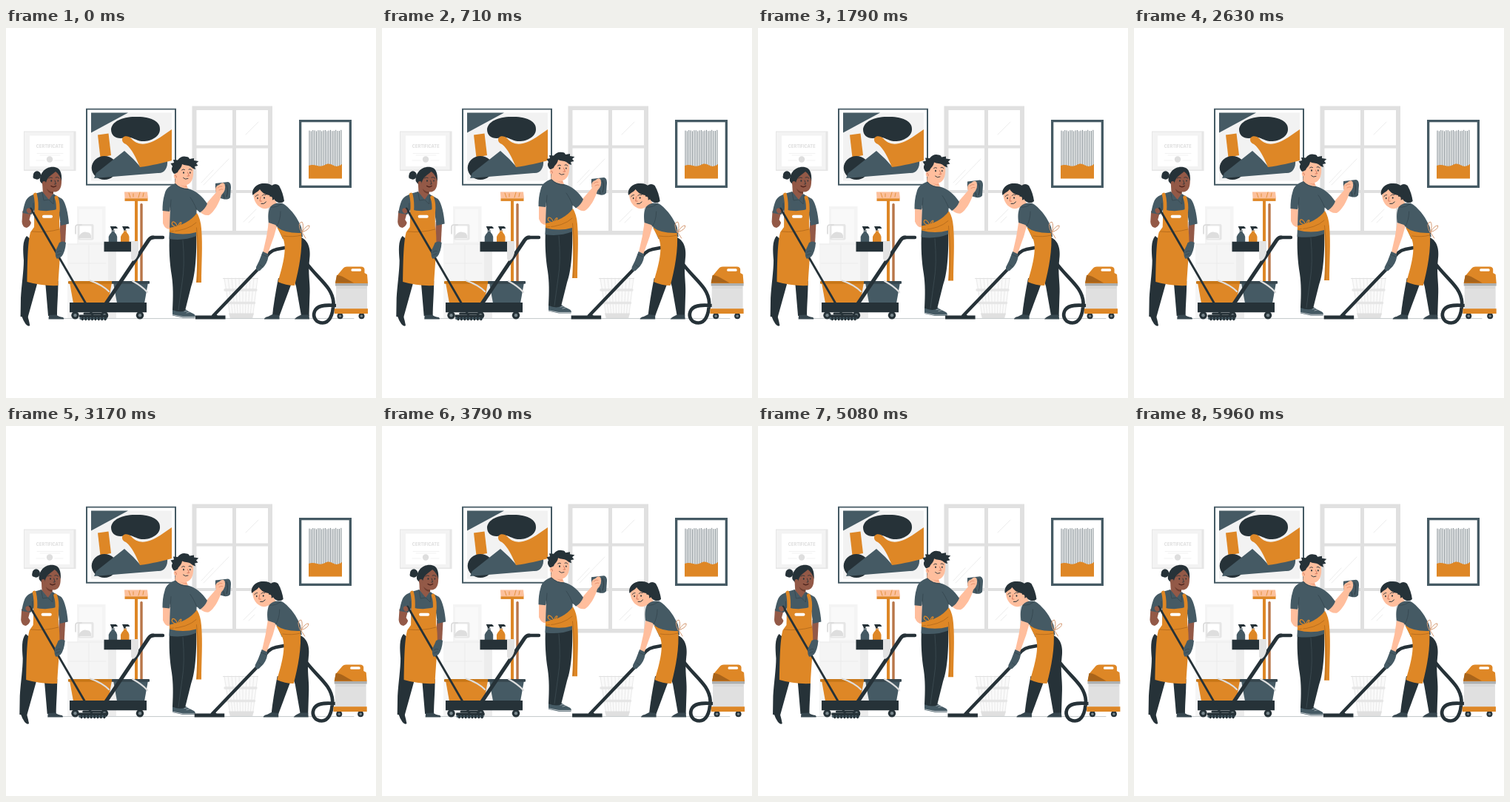
Recreate the animation shown at these times as an HTML page with a canvas. Size 500x500 px, loop 6 s.

```html
<!DOCTYPE html>
<html lang="en">
<head>
<meta charset="utf-8">
<title>Cleaning team</title>
<style>
html, body { margin: 0; width: 100%; height: 100%; overflow: hidden; background: #fff; }
canvas { display: block; width: 500px; height: 500px; }
</style>
</head>
<body>
<canvas id="stage"></canvas>
<script>
const canvas = document.getElementById('stage');
const c = canvas.getContext('2d');
const ratio = Math.max(1, window.devicePixelRatio || 1);
canvas.width = canvas.height = 500 * ratio;

const LOOP = 6000;
const ORANGE = '#de8726', DARK = '#263238', SLATE = '#455a64', BROWN = '#935947',
  SKIN = '#ffbe9d', GREY = '#e0e0e0', PALE = '#f5f5f5', WHITE = '#fff', SHADE = '#a9641a';

// Shape helpers
const fill = (color, d) => { c.fillStyle = color; c.fill(new Path2D(d)); };
const line = (color, width, d) => {
  c.strokeStyle = color;
  c.lineWidth = width;
  c.stroke(new Path2D(d));
};
const rect = (color, x, y, w, h, r = 0) => {
  c.fillStyle = color;
  c.beginPath();
  c.roundRect(x, y, w, h, r);
  c.fill();
};
const oval = (color, x, y, rx, ry = rx, turn = 0) => {
  c.fillStyle = color;
  c.beginPath();
  c.ellipse(x, y, rx, ry, turn, 0, Math.PI * 2);
  c.fill();
};
const wheel = (x, y, r) => { oval(DARK, x, y, r); oval('#78868c', x, y, r * 0.42); };

function drawWindow() {
  rect(GREY, 251.5, 105.5, 108.5, 174);
  for (const [y, h] of [[111, 47.5], [162.5, 56.5], [223, 51]]) {
    rect(WHITE, 257.5, y, 48.5, h);
    rect(WHITE, 311, y, 43, h);
  }
  line('#ededed', 1, 'M324 144L341 127M264 209L280 192M267 212L301 177M321 262L338 245M328 263L336 255');
}

function drawCertificate() {
  rect('#e6e6e6', 24, 139.5, 70.5, 53.5);
  rect('#f3f3f3', 25, 140.5, 66.5, 51);
  rect(WHITE, 32, 145.5, 54, 41.5);
  line('#e9e9e9', 0.6, 'M42 169.5H77M46 172H73M41 179H52M66 179H77');
  oval('#dedede', 59, 177.5, 4.2);
  c.fillStyle = '#dcdcdc';
  c.font = 'bold 5.7px Inter, Arial, sans-serif';
  c.textAlign = 'center';
  c.fillText('CERTIFICATE', 59.2, 162.3);
}

function drawAbstract() {
  rect(SLATE, 108, 108.7, 122, 104);
  rect(WHITE, 110, 110.6, 118, 100.2);
  rect('#f2f2f2', 115, 114.5, 109, 92);
  fill(SLATE, 'M115 114.5H165L115 141.5Z');
  fill(DARK, 'M142 137C143 126 158 119 178 120C197 120 209 127 208 137C208 147 195 154 183 153C174 152 170 146 161 148C151 151 142 147 142 137Z');
  fill(ORANGE, 'M124 144.5L138.5 142.5L142 172L127.5 175Z');
  oval(DARK, 133, 189, 17.3, 16);
  fill(SLATE, 'M119 203L122 196L160 166L172 177L181 187L218 179C219 189 214 197 205 196Z');
  fill(ORANGE, 'M157 151C157 146 164 144 170 150C180 161 194 157 208 148L224 137V179C212 182 197 186 181 188C176 176 170 163 162 157Q157 155 157 151Z');
}

function drawStripes() {
  rect(SLATE, 396, 124, 71, 92);
  rect(WHITE, 399.3, 127.3, 64.4, 85.4);
  for (let i = 0; i < 19; i++) {
    const x = 410 + i * 2.38;
    line('#4e5c63', 0.75, `M${x} ${139 + Math.sin(i * 2) * 0.8}V187`);
  }
  fill(ORANGE, 'M409 186Q414 184 420 186T431 185T442 185.5T454 184V203.5H409Z');
}

function drawCabinet() {
  rect('#f4f4f4', 96, 241, 38.5, 51);
  rect('#f9f9f9', 99, 245, 31, 44);
  rect('#ededed', 134, 301, 15, 91);
  rect(PALE, 83, 291.5, 55, 100.5);
  line('#e9e9e9', 0.8, 'M83 292H138M85 318H135M112 294V342');
  rect('#e6e6e6', 97, 265, 21.5, 21.5, 2);
  rect(WHITE, 99.5, 267.5, 16, 17, 1);
  fill('#dedede', 'M98 282Q103 274 109 276Q116 276 115 284H98Z');
  line('#d9d9d9', 1.6, 'M94 278V269Q94 266 97 266H102');
}

function drawBasket() {
  fill('#fafafa', 'M294 339H340L334 392H302Z');
  for (let i = 0; i < 10; i++) line('#e6e6e6', 0.8, `M${295 + i * 5} 338L${303 + i * 3.4} 388`);
  line(GREY, 1, 'M293.5 338.5H340.5');
  line('#e6e6e6', 3.4, 'M296 354H338M298.5 371.5H335.5');
  fill(GREY, 'M301 385.5H335L333 392H303Z');
}

function bottle(x, color) {
  fill(color, `M${x} 289V282Q${x + 1} 279 ${x + 4} 276V273H${x + 8}V276Q${x + 11} 279 ${x + 11.5} 282V289Z`);
  line('#dddddd', 1.2, `M${x + 4} 274H${x + 8}`);
  fill(DARK, `M${x + 2} 268H${x + 10}L${x + 12} 270V271H${x + 7}L${x + 6.5} 273.5H${x + 4.5}Z`);
}

function drawCart() {
  rect('#b87548', 181.3, 237, 3.4, 106, 1.5);
  rect(ORANGE, 174, 232, 4, 111);
  fill('#fcc09c', 'M160 221.5H191L192 230.5H160.5Z');
  line(ORANGE, 0.8, 'M166 223L168 229M172 224V228M179 229L181 222M186 223L185 228');
  rect(ORANGE, 160.5, 230.3, 31, 3.6);

  fill(ORANGE, 'M86 344H143L138 372H91Z');
  rect('#c87718', 84, 342, 60.5, 3.8, 1);
  fill(SLATE, 'M145 344H192L187 372H150Z');
  rect('#37474f', 143, 342, 51, 3.8, 1);
  line('#dedede', 2.2, 'M114 341.5Q130 347 139 356M171 342Q184 349 191 357');

  bottle(138.7, SLATE);
  bottle(155, ORANGE);
  line(DARK, 5, 'M134 374L192.5 287Q195 283 199 283');
  line(DARK, 4.4, 'M197 283H212');
  rect(DARK, 132.5, 288.8, 37, 13.4);
  fill('#e3e3e3', 'M169 288H179V304Q177 312 172 315L169 312Z');
  rect(DARK, 86, 371, 104, 13.3);
  for (const x of [93.5, 133, 181]) wheel(x, 388.2, 5.2);
}

function drawMopper() {
  fill(DARK, 'M28 281C22 288 23 300 24 314C24 328 21 348 20 365L19.6 390L29.5 391L42 346L50 300Z');
  fill(DARK, 'M53 342H70.5C70.5 361 69 374 69 389H57Z');
  fill(DARK, 'M21.5 390L29.5 390Q31 395 32.3 402Q30 404 26.5 400Q23 395 21.5 390Z');
  fill('#37474f', 'M58 388L68 387.5Q71 390 77 391Q79 392 78 393.5H57.5Z');

  oval(DARK, 42, 199, 5.2, 5.7);
  oval(DARK, 39, 201, 2.5, 2.8);
  fill(BROWN, 'M49 208L50 226Q57 238 64 230L63 217Z');
  fill(BROWN, 'M49 207C51 195 61 189 69 192C75 196 76 206 74.5 213C73 220 68 223 62 221C55 219 50 215 49 207Z');
  fill('#6f3f31', 'M55 217Q59 222 64 221L64 224Q57 224 55 217Z');
  fill(DARK, 'M46 207C45 195 55 186 66 188C73 189 76 196 75 207C74 202 71 197 67 194C61 199 58 200 55 206L53 212Q49 212 46 207Z');
  oval(BROWN, 51.5, 210, 2.5, 3);
  line(DARK, 0.8, 'M57.5 203Q60 201 62.5 202.5M67 202Q69.5 200.5 72 203M66 206L67.5 211H65.5');
  oval(DARK, 61.3, 206.5, 0.9, 1.2);
  oval(DARK, 70.3, 206.5, 0.8, 1.1);
  line('#4d241d', 1.4, 'M61 213.5Q64 216 67.5 213.5');

  fill(BROWN, 'M22.5 247L34 250L31.5 259L34 263Q33 268 28 270Q22 269 21.5 262Z');
  fill(BROWN, 'M73 262H81.5L80 291H72Z');
  fill(SLATE, 'M49 221C38 224 30 227 27 233C24 240 23.5 245 22.5 250L34.5 252L38 246L39 274H72L71 246L74 267L85 264.5C84 251 81 237 76 231L63.5 224L58 232Z');
  line('#37474f', 0.8, 'M49 222L51 233L58 232L64 238L65 225M37 247L37 237M72 249L71 241');
  line(ORANGE, 4.8, 'M39.5 225Q42 235 41 248M68 229Q71 237 70 248');
  fill(ORANGE, 'M38.8 245Q56 250 72.3 244L72 268C76 286 72 316 70.5 348Q49 349 28.5 343C29 320 29 291 33 276L38 269Z');
  line('#a9641a', 0.7, 'M35 275Q54 277 72 272');
  rect(WHITE, 49, 252.8, 14, 4, 1.8);

  line(DARK, 2.8, 'M33.5 244L117 388');
  oval(BROWN, 31, 247, 3, 3.8, -0.5);
  fill(SLATE, 'M72 290Q70 295 67 301Q66 309 69 312L75 309Q80 303 81 290Q77 287 72 290Z');
  line('#37474f', 0.8, 'M69 303Q73 300 75 302M69 307L74 305');
  line(DARK, 3, 'M106 386H130');
  rect(DARK, 99, 387.5, 38.5, 4, 1);
  line(SLATE, 3.2, 'M101 392.5H135');
  for (let x = 102; x < 136; x += 4.4) rect(DARK, x, 391, 2.6, 4.3, 1);
}

function drawWiper() {
  fill(SLATE, 'M225 380L240 378.5Q246 383 253 386Q257 388 255.5 391.5H239L225 388.5Z');
  line('#dfe3e5', 0.8, 'M225.5 387.7L239 390.3H255.5');
  line('#b8c1c5', 0.7, 'M241 383L245 382M244 385L248 384');
  fill(DARK, 'M221 279L257 275C258 305 256 334 250 350L242 382Q235 385 225 381C226 362 226 349 224 335C221 318 220 298 221 279Z');
  line('#3e4d54', 0.8, 'M239 287Q242 321 238 344L233 381');

  fill(SKIN, 'M212 245H221.5L222 260L221 272Q215 272 212 264Z');
  fill(SKIN, 'M229 199L228 213Q236 221 246 217L243 209Z');
  fill('#f09a79', 'M235 211Q240 215 244 213L244 215Q239 215 235 211Z');
  fill(SKIN, 'M229 191L230 207C233 213 243 215 249 209C254 204 254 192 252 184L238 180Z');
  oval(SKIN, 229.5, 200, 2.7, 3.6);
  fill(DARK, 'M227 197C224 194 223 190 225 187L222.5 183L227 182L226 178L232 178.5Q237 172 244 174Q247 174 248 177L254 176L254 179L260.3 180L257 183L259.5 186L255 187L256 191Q252 190 249 187C246 185 241 186 238 184C237 190 234 190 232 195L230 196Z');
  line(DARK, 0.9, 'M237.5 192Q239 190 241.5 191.5M247 191Q249 189.5 251 192');
  oval(DARK, 240, 195.5, 0.9, 1.3);
  oval(DARK, 248.8, 195.5, 0.8, 1.2);
  line('#c96950', 0.8, 'M245.5 195L247.5 200H245M228.5 199Q231 199 230 202');
  line(DARK, 0.9, 'M239.5 202.5Q242 205.5 246 203.5');

  fill(SLATE, 'M283 210L300 208Q304 209 304 215L303 229Q301 232 295 231.5L286 229Q282 218 283 210Z');
  line(DARK, 0.7, 'M298 212Q301 220 298 228M294 225L295 230');
  fill(SKIN, 'M260 246L271 237L284 222C282 217 284 213 288 212Q293 207 295.5 211Q298 219 291 226C288 237 281 249 274 253Q266 254 260 246Z');
  line('#d9805f', 0.7, 'M286 216Q289 213 292 214M288 219Q291 217 293 218');
  fill(SLATE, 'M229 210C221 213 216 217 214.5 224C212 232 211.5 239 211.5 247L221 248L222 241L220.5 285Q240 288 257.5 281V245L262 249.5Q269 245 272 237.5C265 227 257 220 246 217Q235 217 229 210Z');
  line('#34464e', 0.8, 'M222 246L223 232M258 246Q253 234 249 229M229 211Q236 218 246 218');
  fill(ORANGE, 'M221 270Q246 266 258 250Q263 258 264 271C266 295 264 319 264 344H257C259 320 258 295 257 276Q239 281 221 276Z');
  line(SHADE, 0.7, 'M222 275Q245 274 257 263M257.5 270Q261 300 258.5 343');
  line(ORANGE, 1.2, 'M231 269Q222 267 225 262Q229 261 232 269Q235 261 237 263Q236 267 232 269L227 275');
}

function drawHose() {
  line(DARK, 4.7, 'M404 315C421 339 441 349 442.5 371C442 390 436 398.5 428 398.5C419 398.5 414 391 417 383C420 375 430 373.5 446 375');
}

function drawVacuum() {
  wheel(451.5, 389.3, 4);
  wheel(480.5, 389.3, 4);
  rect(GREY, 446, 348, 42, 32);
  line('#cfcfcf', 1, 'M447 351H487');
  rect('#aeb0b0', 445, 344.8, 44, 3.6);
  fill(ORANGE, 'M445 345L447 335L455 325.5Q457 322.5 461 322.5H480Q484 322.5 484.5 326V331L488 333L489 345Z');
  fill(SHADE, 'M445 344.5L447 334Q451 334 455 336L470 344.5Z');
  rect(WHITE, 466.5, 325.3, 13.5, 3.4, 1.5);
  rect(ORANGE, 443.7, 379.3, 45.3, 6.6);
}

function drawVacuumer() {
  drawHose();
  drawVacuum();
  line(DARK, 4.5, 'M348 315Q355 301 366 299L382 296');

  fill(DARK, 'M388 281L399 283C410 288 412 301 410 314C408 330 411 344 410.5 357L409.5 389H399L392 349L382 320Z');
  fill('#37474f', 'M399 387.5H409.5L410 393.5H390Q391 391 399 387.5Z');
  fill(DARK, 'M368 338L387 342L369.5 389L360 388Q362 369 368 338Z');
  fill('#37474f', 'M360 387L369.5 388V393.5H349Q349 391 354 390Z');

  fill(DARK, 'M359 213Q364 209 369 213C373 220 375 227 376 234Q372 238 366 235L358 230Z');
  fill(SKIN, 'M352 236L360 247L368 240L359 226Z');
  fill(SKIN, 'M335 221C333 229 337 240 346 243.5C354 246 360 241 361 233C362 224 357 216 349 216Z');
  fill(DARK, 'M333.5 226C331 217 340 209 350 210C360 210 366 217 364 227Q363 234 358 232L356 226C349 225 346 222 343 218C340 222 337 222 333.5 226Z');
  oval(SKIN, 357.5, 231, 2.5, 3.2);
  line(DARK, 0.8, 'M337 228Q338 225 341 225.5M346 226.5Q348 224 351 225.5');
  oval(DARK, 340, 230, 0.8, 1.2);
  oval(DARK, 349, 229.5, 0.9, 1.2);
  line('#c96950', 0.8, 'M344 228L343 234H345.5');
  line(DARK, 1, 'M345 237.5Q349 238.5 351.5 235');

  fill(SKIN, 'M355.5 260L367 264L362 282L353 307L347 304L352 282Z');
  fill(SLATE, 'M357 242C362 236 371 235 377 239C387 247 394 257 399 269L401 282Q387 288 374 285L367 269L364 266L355 263C354 255 354 248 357 242Z');
  line('#34464e', 0.8, 'M371 248Q371 259 366 268M358 242Q366 243 373 237');
  fill(ORANGE, 'M366 269Q378 278 399 277C401 298 396 326 390 348Q378 348 367.5 343C373 324 380 301 375 286Z');
  line(SHADE, 0.7, 'M375 281Q388 283 399 280');
  line('#d69b74', 1, 'M399 276Q393 263 400 262Q403 266 400 276Q406 266 410 267Q411 272 400 276L405 284');

  line(DARK, 4.5, 'M280 389L349 317');
  fill(SLATE, 'M347 302L354.5 305.5Q355 314 349 322L343 328Q337 329 338 323L342 315Z');
  line('#34464e', 0.8, 'M343 320L347 323M346 306L353 309');
  fill(DARK, 'M256 388.5H278L283 386L286 388.5H296.5V393.5H256Z');
}

// Sideways shake, linear between ten equal steps
const SHAKE = [0, -1, 2, -4, 4, -4, 4, -4, 2, -1, 0];
function shake(t) {
  const p = t / LOOP * 10, i = Math.floor(p);
  return 0.75 * (SHAKE[i] + (SHAKE[i + 1] - SHAKE[i]) * (p - i));
}

// Up and down once every 1.5 s
const bob = t => -6.2 * (1 - Math.abs(t % 1500 / 750 - 1));

function moved(x, y, draw) {
  c.save();
  c.translate(x, y);
  draw();
  c.restore();
}

function frame(now) {
  const t = now % LOOP, x = shake(t);
  c.setTransform(ratio, 0, 0, ratio, 0, 0);
  c.lineCap = 'round';
  c.lineJoin = 'round';
  rect(WHITE, 0, 0, 500, 500);
  drawWindow();
  drawCertificate();
  drawAbstract();
  drawStripes();
  drawCabinet();
  line('#aab0b3', 0.7, 'M60 392.6H470');
  drawBasket();
  drawCart();
  moved(0, bob(t), drawWiper);
  moved(x, 0, drawVacuumer);
  moved(x, 0, drawMopper);
  requestAnimationFrame(frame);
}

const start = performance.now();
requestAnimationFrame(now => frame(Math.max(0, now - start)));
</script>
</body>
</html>
```
